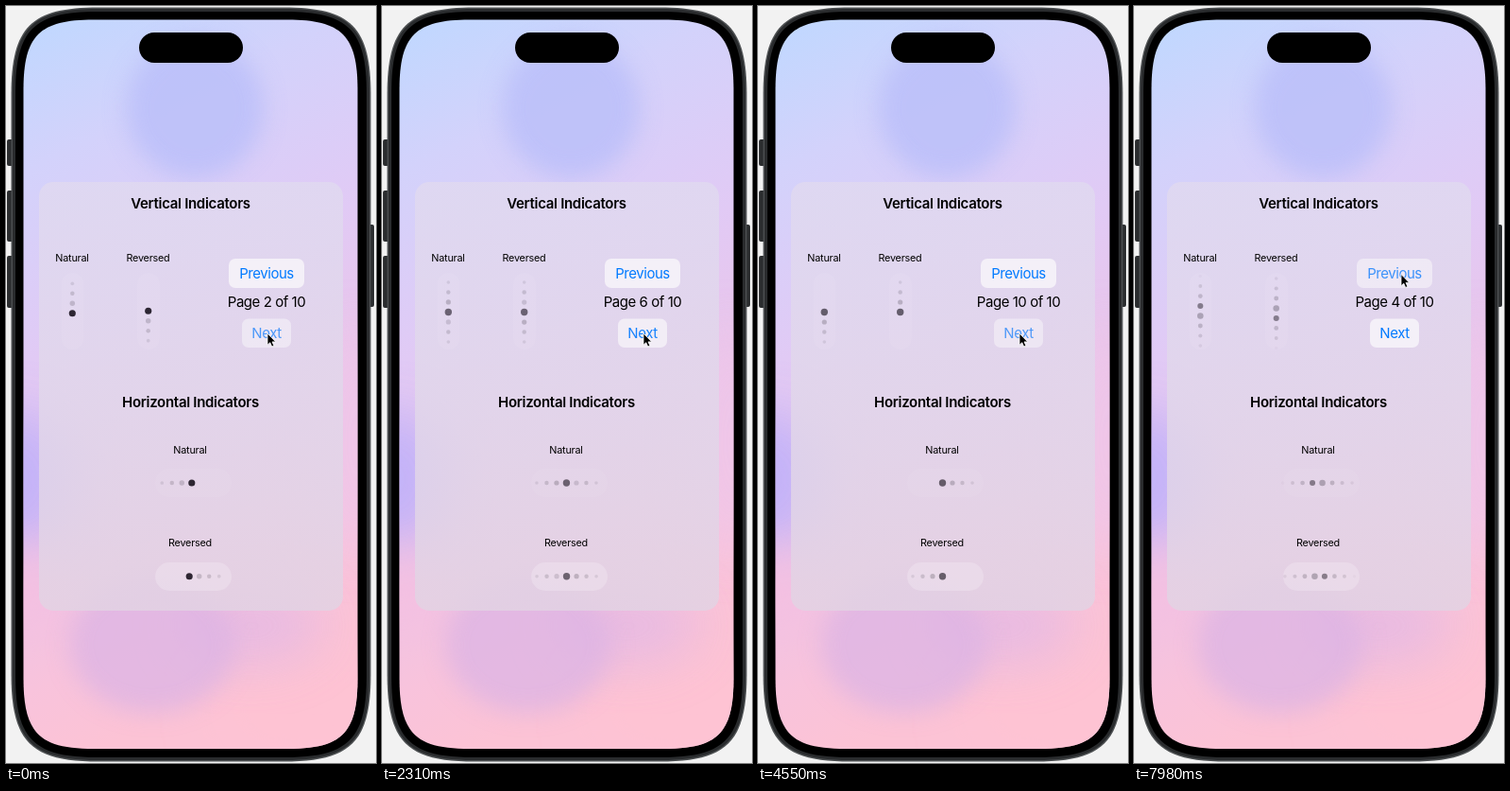
An HTML page for the animation above (8 s loop, 392 px wide and 800 px high).

```html
<!DOCTYPE html>
<html lang="en">
<head>
<meta charset="utf-8">
<style>
  html, body { margin: 0; width: 100%; height: 100%; overflow: hidden; background: #f2f2f2; }
  svg { display: block; width: 392px; height: 800px; }
  text { font-family: Inter, sans-serif; text-anchor: middle; letter-spacing: -.02em; fill: #000; }
  .title { font-size: 15px; font-weight: 600; }
  .body { font-size: 15px; letter-spacing: -.03em; }
  .small { font-size: 10.8px; }
  .link { fill: #007aff; }
</style>
</head>
<body>
<svg viewBox="0 0 392 800">
  <defs>
    <clipPath id="screen"><path id="glass"/></clipPath>
    <filter id="soft" x="-60%" y="-60%" width="220%" height="220%"><feGaussianBlur stdDeviation="12"/></filter>
    <filter id="wide" x="-60%" y="-60%" width="220%" height="220%"><feGaussianBlur stdDeviation="26"/></filter>
    <linearGradient id="sky" x1="0" y1="0" x2=".22" y2="1">
      <stop offset="0" stop-color="#bfd8ff"/>
      <stop offset=".2" stop-color="#d3d2fb"/>
      <stop offset=".45" stop-color="#e1caf5"/>
      <stop offset=".7" stop-color="#ecc3e7"/>
      <stop offset=".88" stop-color="#f8c3dc"/>
      <stop offset="1" stop-color="#fcc3d5"/>
    </linearGradient>
    <linearGradient id="panel" x1="0" y1="0" x2="0" y2="1">
      <stop offset="0" stop-color="#e0d9f0"/>
      <stop offset=".5" stop-color="#e1d7ea"/>
      <stop offset="1" stop-color="#e2d3e3"/>
    </linearGradient>
  </defs>

  <g fill="#2b2d2f">
    <rect x="1" y="141" width="8" height="28" rx="2"/>
    <rect x="1" y="195" width="8" height="54" rx="2"/>
    <rect x="1" y="264" width="8" height="55" rx="2"/>
    <rect x="382" y="231" width="8" height="87" rx="2"/>
  </g>
  <path id="rim" fill="#4b4e50"/>
  <path id="frame" fill="#292b2d"/>
  <path id="bezel"/>

  <g clip-path="url(#screen)">
    <rect x="18" y="14" width="355" height="772" fill="url(#sky)"/>
    <ellipse cx="372" cy="460" rx="50" ry="120" fill="#efc7ea" filter="url(#wide)" opacity=".7"/>
    <ellipse cx="10" cy="500" rx="62" ry="72" fill="#c0b1f9" filter="url(#wide)" opacity=".9"/>
    <ellipse cx="20" cy="622" rx="45" ry="36" fill="#f5c0e1" filter="url(#wide)"/>
    <ellipse cx="330" cy="745" rx="110" ry="55" fill="#fec3d3" filter="url(#wide)"/>
    <ellipse cx="200" cy="108" rx="73" ry="74" fill="#b9bef9" filter="url(#soft)" opacity=".8"/>
    <ellipse cx="260" cy="655" rx="75" ry="42" fill="#e4b9e4" filter="url(#wide)" opacity=".8"/>
    <ellipse cx="155" cy="675" rx="88" ry="72" fill="#dcb4e4" filter="url(#soft)" opacity=".75"/>
  </g>
  <rect x="141" y="28" width="110" height="32" rx="16"/>

  <rect x="35" y="186" width="322" height="453" rx="15" fill="url(#panel)" opacity=".84"/>
  <g fill="#fff">
    <rect x="58.500" y="282" width="24" height="81" rx="12" opacity=".05"/>
    <rect x="139" y="282" width="24" height="81" rx="12" opacity=".05"/>
    <rect x="158" y="489" width="81" height="30" rx="15" opacity=".05"/>
    <rect x="158" y="588" width="81" height="30" rx="15" opacity=".2"/>
  </g>

  <text class="title" x="195.500" y="214">Vertical Indicators</text>
  <text class="title" x="195.500" y="424">Horizontal Indicators</text>
  <text class="small" x="70" y="270">Natural</text>
  <text class="small" x="150.500" y="270">Reversed</text>
  <text class="small" x="195" y="473">Natural</text>
  <text class="small" x="195" y="571">Reversed</text>

  <g id="previous">
    <rect x="236" y="267" width="80" height="31" rx="7" fill="#f4f0f8"/>
    <text class="body link" x="276" y="288">Previous</text>
  </g>
  <text id="label" class="body" x="276" y="318"></text>
  <g id="next">
    <rect x="250" y="330.500" width="52" height="30.500" rx="7" fill="#f4f0f8"/>
    <text class="body link" x="276" y="351">Next</text>
  </g>

  <g id="dots"></g>
  <path id="cursor" d="M0 0V12.200L2.800 9.700 4.700 14 6.900 13 5 8.900H8.700Z" fill="#000" stroke="#fff" stroke-width=".8"/>
</svg>
<script>
  const LOOP = 8000, STEP = 70, PAGES = 10, GAP = 10.5, SLIDE = 250;
  const byId = id => document.getElementById(id);
  const clamp = v => Math.min(1, Math.max(0, v));
  const ease = u => u < .5 ? 2 * u * u : 1 - 2 * (1 - u) ** 2;
  const mix = (a, b, u) => a + (b - a) * u;

  // Continuous-curvature corners: longer and flatter at the ends than a circular arc.
  function shell(id, left, top, right, bottom, radius) {
    const reach = 1.4 * radius, pull = .315 * radius;
    byId(id).setAttribute('d', `M${left} ${top + reach}
      C${left} ${top + pull} ${left + pull} ${top} ${left + reach} ${top} H${right - reach}
      C${right - pull} ${top} ${right} ${top + pull} ${right} ${top + reach} V${bottom - reach}
      C${right} ${bottom - pull} ${right - pull} ${bottom} ${right - reach} ${bottom} H${left + reach}
      C${left + pull} ${bottom} ${left} ${bottom - pull} ${left} ${bottom - reach} Z`);
  }
  shell('rim', 5.5, 1.5, 386.5, 798.5, 66);
  shell('frame', 7, 3, 385, 797, 64.5);
  shell('bezel', 10, 6, 382, 794, 61.5);
  shell('glass', 18.5, 14.5, 372.5, 785, 53);

  // Button releases: forward to the last page (one extra tap there), then back.
  const clicks = [];
  for (let i = 0; i < 9; i++) clicks.push({ time: -62 + i * 534, page: i + 2, button: 'next' });
  clicks.push({ time: 4610, page: 10, button: 'next' });
  for (let i = 0; i < 6; i++) clicks.push({ time: 5615 + i * 445, page: 9 - i, button: 'previous' });

  const indicators = [
    { x: 70.3, y: 323.5, vertical: true, sign: -1 },
    { x: 150.7, y: 323.5, vertical: true, sign: 1 },
    { x: 195.5, y: 504, sign: -1 },
    { x: 195.5, y: 602.7, sign: 1 }
  ];
  for (const indicator of indicators) {
    indicator.dots = Array.from({ length: PAGES }, () => {
      const dot = document.createElementNS('http://www.w3.org/2000/svg', 'circle');
      dot.setAttribute('fill', '#17111c');
      return byId('dots').appendChild(dot);
    });
  }

  function drawIndicator({ x, y, vertical, sign, dots }, from, to, progress) {
    const current = mix(from, to, progress);
    const moving = progress < 1 && from !== to;
    dots.forEach((dot, i) => {
      const page = i + 1, distance = Math.abs(page - current);
      const shift = sign * (page - current) * GAP;
      const visible = clamp((3.75 - distance) * 2);
      let alpha = mix(.21, .09, clamp((distance - 1) / 2)) * visible;
      if (page === to) alpha = moving ? mix(.17, .6, progress ** 3) : .62;
      else if (moving && page === from) alpha = mix(1, .13, progress);
      dot.setAttribute('cx', vertical ? x : x + shift);
      dot.setAttribute('cy', vertical ? y + shift : y);
      dot.setAttribute('r', distance < 1 ? mix(3.7, 2.6, distance) : mix(2.6, 1.8, clamp((distance - 1) / 2)));
      dot.setAttribute('opacity', alpha);
    });
  }

  function pressAmount(button, t) {
    return Math.max(...clicks.filter(c => c.button === button).map(c =>
      t < c.time ? clamp((t - c.time + 80) / 20) : clamp(1 - ((t - c.time) / 280) ** 2)));
  }

  function draw(t) {
    const index = clicks.findLastIndex(c => c.time <= t);
    const click = clicks[index], from = index ? clicks[index - 1].page : 1;
    const progress = ease(clamp((t - click.time) / SLIDE));
    indicators.forEach(indicator => drawIndicator(indicator, from, click.page, progress));
    byId('label').textContent = `Page ${click.page} of ${PAGES}`;
    for (const button of ['next', 'previous']) {
      byId(button).setAttribute('opacity', 1 - .35 * pressAmount(button, t));
    }
    const travel = ease(clamp((t - 4800) / 550));
    byId('cursor').setAttribute('transform', `translate(${mix(277, 283, travel)} ${mix(346, 283.5, travel)})`);
  }

  function tick() {
    draw(Math.floor(performance.now() % LOOP / STEP) * STEP);
    requestAnimationFrame(tick);
  }
  tick();
</script>
</body>
</html>
```
